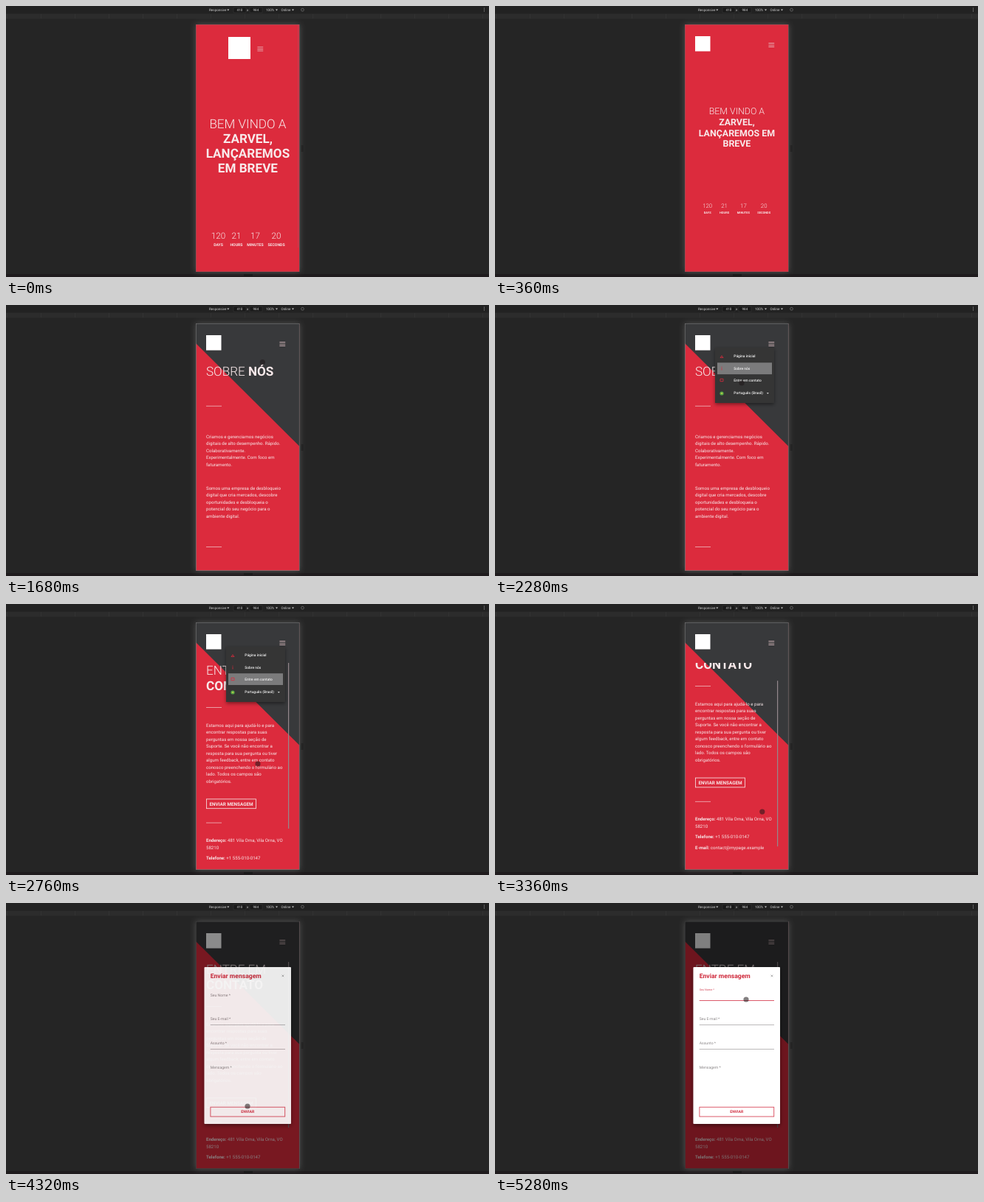
Animation, 654 px wide and 368 px high, one loop 5400 ms. Source, as an HTML page:

```html
<!DOCTYPE html>
<html lang="pt-BR">
<head>
<meta charset="utf-8">
<title>Menu e formulário</title>
<style>
html, body { margin: 0; width: 100%; height: 100%; overflow: hidden; background: #252525; }
svg { display: block; width: 654px; height: 368px; font-family: Roboto, sans-serif; text-rendering: geometricPrecision; }
.mid { text-anchor: middle; }
</style>
</head>
<body>
<svg id="stage" viewBox="0 0 654 368"></svg>
<script>
const LOOP = 5400, STEP = 120;
const RED = '#dc2b3d', PALE = '#f8e9ea', DARK = '#38393b';
const stage = document.getElementById('stage');

const rect = (x, y, w, h, fill, extra = '') =>
  `<rect x="${x}" y="${y}" width="${w}" height="${h}" fill="${fill}" ${extra}/>`;
const text = (x, y, size, str, { fill = PALE, weight = 400, mid = false, id = '' } = {}) =>
  `<text x="${x}" y="${y}" font-size="${size}" fill="${fill}" font-weight="${weight}"
    ${mid ? 'class="mid"' : ''} ${id && `id="${id}"`}>${str}</text>`;
const lines = (x, y, gap, size, list, opts) =>
  list.map((s, i) => text(x, y + i * gap, size, s, opts)).join('');
const group = (id, body, extra = '') => `<g id="${id}" ${extra}>${body}</g>`;
const rule = y => rect(271, y, 21, .8, '#efb9be');
const bars = (x, y) => [0, 2.5, 5].map(d => rect(x, y + d, 7.8, .8, '#e9c9cc')).join('');
const caret = (x, y) => `<path d="M${x} ${y}h3l-1.5 2z" fill="#ccc"/>`;

function chrome() {
  const label = (x, s) => text(x, 7.2, 4.6, s, { fill: '#d0d0d0' });
  let ticks = '';
  for (let x = 1; x < 654; x += 46) ticks += rect(x, 11, .5, 6, '#383838');
  return rect(0, 0, 654, 368, '#252525') + rect(0, 0, 654, 10.5, '#222') +
    rect(0, 10.5, 654, 7, '#2c2c2c') + ticks + rect(0, 364, 654, 4, '#1f1b1d') +
    label(275, 'Responsive') + caret(299.3, 4.5) +
    [308, 330].map(x => rect(x, 2, 17, 7, '#1a1a1a', 'stroke="#3a3a3a" stroke-width=".5"')).join('') +
    label(312.5, '410') + label(326, 'x') + label(334.5, '984') +
    label(352, '100%') + caret(365, 4.5) + label(372.5, 'Online') + caret(387, 4.5) +
    '<circle cx="401.5" cy="5.2" r="1.9" fill="none" stroke="#777" stroke-width=".7"/>' +
    [3, 5, 7].map(y => `<circle cx="647.5" cy="${y}" r=".5" fill="#bbb"/>`).join('') +
    rect(399.5, 189, 3, 9, '#1a1a1a') + rect(322, 364, 12, 2.5, '#111') +
    rect(257, 25, 140.5, 336, '#6a6a6a', 'filter="url(#glow)"');
}

function countdown(id, xs, y, numSize, labelY, labelSize) {
  return ['120', '21', '17', '20'].map((n, i) =>
    text(xs[i], y, numSize, n, { mid: true, weight: 300, id: i === 3 ? id : '' }) +
    text(xs[i], labelY, labelSize, ['DAYS', 'HOURS', 'MINUTES', 'SECONDS'][i], { mid: true, weight: 700 })
  ).join('');
}

function hero(y, gap, size, bold) {
  return text(327.4, y, size, 'BEM VINDO A', { mid: true, weight: 300 }) +
    lines(327.4, y + gap, gap, size, bold, { mid: true, weight: 700 });
}

const wide = rect(301, 42, 30, 30, '#fff') + bars(340.4, 55.5) +
  hero(165.9, 20, 17.1, ['ZARVEL,', 'LANÇAREMOS', 'EM BREVE']) +
  countdown('secWide', [287.5, 312, 337.5, 366], 316, 11.7, 325.6, 5.15) +
  rect(395.3, 25, .8, 303, '#b8495a');

const home = hero(147.4, 14.65, 12.4, ['ZARVEL,', 'LANÇAREMOS EM', 'BREVE']) +
  countdown('secHome', [287.7, 310.6, 336.4, 364.2], 274.2, 7.8, 281.9, 4);

const backdrop = `<path d="M257 25h140.5v167L257 52z" fill="${DARK}"/>`;

const about = `<text x="271" y="96.4" font-size="17.1" fill="${PALE}" font-weight="300">SOBRE
  <tspan font-weight="700">NÓS</tspan></text>` + rule(136.8) +
  lines(271, 180.6, 9.55, 6.12, ['Criamos e gerenciamos negócios',
    'digitais de alto desempenho. Rápido.', 'Colaborativamente.',
    'Experimentalmente. Com foco em', 'faturamento.']) +
  lines(271, 250.7, 9.55, 6.12, ['Somos uma empresa de desbloqueio',
    'digital que cria mercados, descobre', 'oportunidades e desbloqueia o',
    'potencial do seu negócio para o', 'ambiente digital.']) + rule(328);

const strong = s => `<tspan font-weight="700">${s}</tspan>`;
const contact = text(271, 96.4, 17.1, 'ENTRE EM', { weight: 300 }) +
  text(271, 117.2, 17.1, 'CONTATO', { weight: 700 }) + rule(140) +
  lines(271, 166.6, 9.53, 6.12, ['Estamos aqui para ajudá-lo e para',
    'encontrar respostas para suas', 'perguntas em nossa seção de',
    'Suporte. Se você não encontrar a', 'resposta para sua pergunta ou tiver',
    'algum feedback, entre em contato', 'conosco preenchendo o formulário ao',
    'lado. Todos os campos são', 'obrigatórios.']) +
  rect(271.4, 264.9, 67.2, 12.8, 'none', `stroke="${PALE}" stroke-width=".8"`) +
  text(305, 273.5, 6.35, 'ENVIAR MENSAGEM', { mid: true, weight: 700 }) + rule(296.7) +
  lines(271, 323.1, 9.5, 6.12, [strong('Endereço:') + ' 481 Vila Orna, Vila Orna, VO', '58210']) +
  lines(271, 347.1, 15, 6.12, [strong('Telefone:') + ' +1 555-010-0147',
    strong('E-mail:') + ' contact@mypage.example']) +
  [273, 290, 307, 324].map(x => rect(x, 385, 10.3, 10.8, '#f0a3aa')).join('');

const menu = rect(298, 58, 80, 75, '#343536', 'filter="url(#shadow)"') +
  rect(301, 78.3, 74, 15.8, '#7b7b7c', 'id="active"') +
  `<g fill="none" stroke="${RED}" stroke-width=".8"><path d="M305 71.5l2-2.7 2 2.7z"/>
   <path d="M307 83.7v1M307 85.5v3"/><path d="M305 100.3h4v3.4h-4z"/></g>
   <circle cx="307" cy="120" r="2.6" fill="#55a845"/><path d="M305.4 120l1.6-1 1.6 1-1.6 1z" fill="#d8cf4a"/>` +
  ['Página inicial', 'Sobre nós', 'Entre em contato', 'Português (Brasil)'].map((s, i) =>
    text(323.3, [71.2, 87.6, 103.9, 121.2][i], 4.9, s, { weight: 500, fill: '#f2f2f2' })).join('') +
  caret(367.8, 119);

const field = (y, s, id) => text(276.7, y, 5.15, s + ' *', { fill: '#8b8788', id });
const modal = rect(268.5, 87, 117.5, 213, '#fff', 'rx="1" filter="url(#shadow)"') +
  text(276.7, 102.4, 8.6, 'Enviar mensagem', { fill: '#cf2a3c', weight: 700 }) +
  '<path d="M373.6 97.6l2.6 2.6m0-2.6l-2.6 2.6" stroke="#777" stroke-width=".6"/>' +
  field(126.8, 'Seu Nome', 'name') + field(159.3, 'Seu E-mail') +
  field(192.2, 'Assunto') + field(224.8, 'Mensagem') +
  rect(276.7, 165, 101.3, .6, '#8f8b8d') + rect(276.7, 198, 101.3, .6, '#8f8b8d') +
  rect(276.7, 132, 101.3, .9, '#d8475a', 'id="focus"') +
  rect(276.9, 277.2, 100.8, 12.8, 'none', 'stroke="#d8475a" stroke-width=".9"') +
  text(327.3, 285.3, 5.1, 'ENVIAR', { mid: true, weight: 700, fill: '#d02c3f' });

stage.innerHTML = `<defs>
  <clipPath id="phone">${rect(257, 25, 140.5, 336, '#000')}</clipPath>
  <clipPath id="view">${rect(257, 80, 140.5, 268, '#000')}</clipPath>
  <filter id="glow" x="-20%" y="-20%" width="140%" height="140%"><feDropShadow dx="0" dy="0" stdDeviation="4" flood-color="#888" flood-opacity=".45"/></filter>
  <filter id="shadow" x="-20%" y="-20%" width="140%" height="140%"><feDropShadow dx="0" dy="2" stdDeviation="2.5" flood-opacity=".45"/></filter>
  </defs>` + chrome() +
  group('screen', rect(257.4, 25.4, 139.8, 335.3, RED) + group('wide', wide) + group('home', home) +
    group('backdrop', backdrop) + group('about', about) +
    group('contact', `<g clip-path="url(#view)">${group('scroll', contact)}</g>`) +
    rect(382, 80, 1.2, 225, '#94888c', 'id="bar"') +
    group('header', rect(271, 41, 20.5, 20.5, '#fff') + bars(370.4, 50.2)) +
    '<rect id="edge" x="257.3" y="25.3" width="139.9" height="335.4" fill="none" stroke="#777" stroke-width=".6"/>' +
    group('menu', menu) + rect(257, 25, 140.5, 336, '#000', 'id="veil"') +
    group('modal', modal) + '<circle id="cursor" r="3.6" fill="#1e1618" fill-opacity=".55"/>',
    'clip-path="url(#phone)"');

const el = {};
stage.querySelectorAll('[id]').forEach(n => el[n.id] = n);
const show = (id, v) => el[id].setAttribute('opacity', v);
const set = (id, attrs) => Object.entries(attrs).forEach(([k, v]) => el[id].setAttribute(k, v));

// Eased progress from time a to time b
const ramp = (t, a, b) => {
  const p = Math.min(1, Math.max(0, (t - a) / (b - a)));
  return p * p * (3 - 2 * p);
};

const path = [[600, 404, 72], [900, 375, 54], [1080, 378, 59], [1380, 336, 86], [1560, 338, 86],
  [1920, 374, 54], [2080, 372, 58], [2280, 334, 106], [2400, 333, 104], [2760, 341, 217],
  [3120, 360, 280], [3840, 367, 288], [4130, 327, 273], [4320, 327, 276], [4980, 340, 131]];

function cursorAt(t) {
  const i = path.findIndex(p => p[0] > t);
  if (i < 0) return path[path.length - 1].slice(1);
  if (i === 0) return path[0].slice(1);
  const [a, x, y] = path[i - 1], [b, u, v] = path[i], p = ramp(t, a, b);
  return [x + (u - x) * p, y + (v - y) * p];
}

function draw(t) {
  const first = t < 240;
  const toAbout = ramp(t, 1400, 1620), toContact = ramp(t, 2280, 2400);
  show('wide', +first);
  show('header', +!first);
  show('home', first ? 0 : 1 - toAbout);
  show('backdrop', toAbout);
  show('edge', toAbout);
  show('about', toAbout * (1 - toContact));
  show('contact', toContact);
  const sec = t < 480 ? 20 : t < 960 ? 19 : 18;
  el.secWide.textContent = el.secHome.textContent = sec;

  const open = ramp(t, 880, 1060) - ramp(t, 1440, 1620) + ramp(t, 1930, 2130) - ramp(t, 2760, 2930);
  const grow = .8 + .2 * open;
  show('menu', open);
  set('menu', { transform: `translate(378 58) scale(${grow}) translate(-378 -58)` });
  show('active', +(t >= 1320));
  set('active', { y: t < 2340 ? 78.3 : 94.2 });

  const scroll = ramp(t, 3090, 3580) - ramp(t, 3840, 4090);
  set('scroll', { transform: `translate(0 ${-50 * scroll})` });
  set('bar', { y: 80 + 42 * scroll });
  show('bar', ramp(t, 2520, 2700));

  const pop = ramp(t, 4190, 4350);
  show('veil', .5 * pop);
  show('modal', pop);

  const focus = ramp(t, 5000, 5200);
  set('name', { y: 126.8 - 8 * focus, 'font-size': 5.15 - 1.35 * focus, fill: focus ? '#d2495a' : '#8b8788' });
  set('focus', { x: 327.35 - 50.65 * focus, width: 101.3 * focus });

  const [cx, cy] = cursorAt(t);
  set('cursor', { cx, cy });
}

function tick() {
  draw(Math.floor(performance.now() % LOOP / STEP) * STEP);
  requestAnimationFrame(tick);
}
tick();
</script>
</body>
</html>
```
